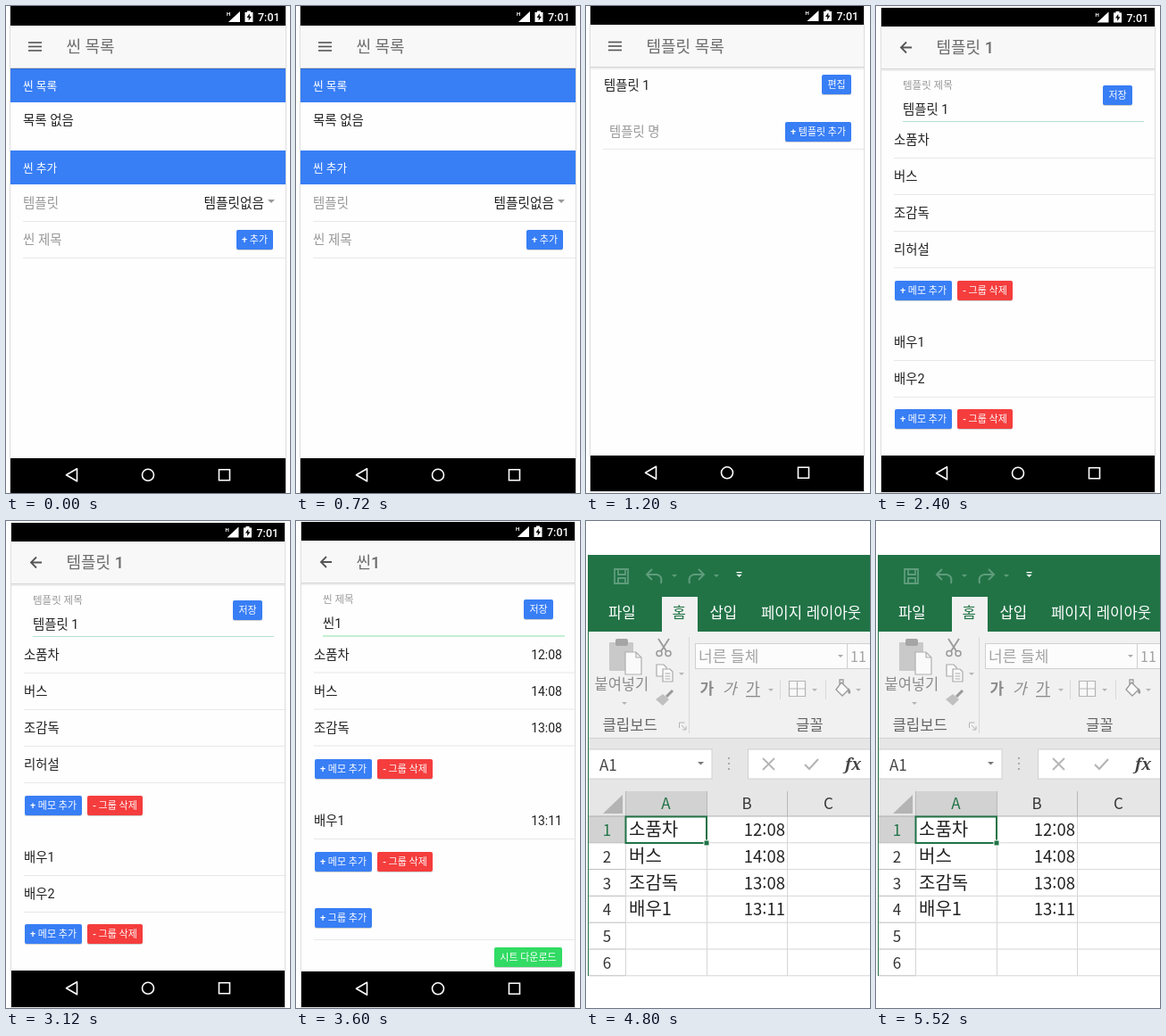
These frames come from a looping animation (318x546 px, 6000 ms). An HTML page:

```html
<!DOCTYPE html>
<html lang="ko">
<head>
<meta charset="utf-8">
<title>씬 목록</title>
<style>
  html, body { margin: 0; width: 100%; height: 100%; overflow: hidden; background: #fff; }
  svg { display: block; width: 100%; height: 100%; }
  text { font-family: Roboto, "Noto Sans CJK KR", "Noto Sans CJK", sans-serif; white-space: pre; }
  .sheet text { font-family: "Noto Sans CJK KR", "Noto Sans CJK", sans-serif; }
  .sheet .fx { font-family: "Noto Serif", serif; }
</style>
</head>
<body>
<svg id="stage" viewBox="0 0 318 546"></svg>
<script>
const BLUE = '#387ef5', RED = '#f53d3d', MINT = '#32db64', INK = '#222', MUTED = '#999';
const GREEN = '#217346', GREY = '#8b8b8b', FADED = '#b5b5b5';
const HOLD = 1200;

const rect = (x, y, right, bottom, fill, extra = '') =>
  `<rect x="${x}" y="${y}" width="${right - x}" height="${bottom - y}" fill="${fill}" ${extra}/>`;
const text = (x, y, str, size, fill = INK, extra = '') =>
  `<text x="${x}" y="${y}" font-size="${size}" fill="${fill}" ${extra}>${str}</text>`;
const path = (d, stroke, width = 1, fill = 'none', extra = '') =>
  `<path d="${d}" stroke="${stroke}" stroke-width="${width}" fill="${fill}" ${extra}/>`;
const shape = (d, fill) => path(d, 'none', 0, fill);
const rule = (y, x, right, color = '#e8e8e8') => rect(x, y, right, y + 1, color);
const caret = (x, y, fill, r = 3) => shape(`M${x - r} ${y}h${2 * r}l${-r} ${r}z`, fill);
const MIDDLE = 'text-anchor="middle"', END = 'text-anchor="end"', MEDIUM = 'font-weight="500"';

function button(x, y, right, label, fill = BLUE) {
  return rect(x, y + 1, right, y + 23, '#000', 'rx="2" opacity=".18"') +
    rect(x, y, right, y + 22, fill, 'rx="2"') +
    text((x + right) / 2, y + 14.7, label, 11, '#fff', `${MIDDLE} ${MEDIUM}`);
}

const memoButtons = y => button(21, y, 85, '+ 메모 추가') + button(91, y, 153, '- 그룹 삭제', RED);

function row(y, label, right, value = '') {
  return text(20, y, label, 14.4) + (value && text(298, y, value, 14, INK, END)) +
    rule(y + 15, 20, right);
}

function statusIcons(dx, dy) {
  return `<g transform="translate(${dx} ${dy})">` +
    text(247, 11, 'H', 6, '#fff', 'font-weight="700"') +
    shape('M262 6v12h-13z', '#fff') +
    shape('M267.5 7h2.5v-1.500h4v1.500h2.500v11h-9z', '#fff') +
    shape('M272.800 8.500l-3.300 4.500h2.200v3.500l3.200-4.700h-2.100z', '#000') +
    text(282, 17, '7:01', 12.5, '#fff', MEDIUM) + '</g>';
}

function navIcons(x, y) {
  return `<g transform="translate(${x} ${y})" fill="none" stroke="#fff" stroke-width="1.6">` +
    '<path d="M-79.500 7V-7L-91.500 0z" stroke-linejoin="round"/><circle r="6.500"/>' +
    '<path d="M79.500-6h12v12h-12z"/></g>';
}

// Device frame: status bar, toolbar, content area and navigation bar.
function phone({ left, right, top, status, toolbar, nav, bottom, title, back, icons, titleY, content }) {
  const iconY = titleY - 6.5;
  const menu = back
    ? path(`M40 ${iconY}H28m6-6l-6 6l6 6`, '#555', 1.8)
    : [-4.5, 0, 4.5].map(d => rect(25, iconY + d - 0.8, 40, iconY + d + 0.8, '#555')).join('');
  return rect(left - 1, top, right + 1, bottom + 1, '#ddd') +
    rect(left, top, right, bottom, '#fefefe') +
    rect(left, top, right, status, '#000') +
    rect(left, status, right, toolbar, '#f8f8f8') +
    rect(left, toolbar - 1, right, toolbar, '#d4d4d4') +
    rect(left, toolbar, right, toolbar + 2, '#eee') +
    menu + text(67.5, titleY, title, 18, '#6c6c6c', MEDIUM) +
    statusIcons(...icons) + content +
    rect(left, nav, right, bottom, '#000') +
    navIcons((left + right) / 2, (nav + bottom) / 2 - 0.7);
}

const sceneList = () => phone({
  left: 5, right: 313, top: 0, status: 22, toolbar: 70, nav: 507, bottom: 546,
  title: '씬 목록', titleY: 52, icons: [0, 0],
  content:
    rect(5, 70, 313, 108, BLUE) + rect(5, 70, 313, 71, '#2f69cb') +
    text(19, 94, '씬 목록', 12.7, '#fff', MEDIUM) +
    text(19, 133, '목록 없음', 14.5) +
    rect(5, 162, 313, 200, BLUE) + text(19, 186, '씬 추가', 12.7, '#fff', MEDIUM) +
    text(19, 226, '템플릿', 14.5, MUTED) +
    text(289, 226, '템플릿없음', 14.7, INK, END) + caret(297, 217, MUTED, 4) +
    rule(241, 19, 313) +
    text(19, 267, '씬 제목', 14.5, MUTED) + button(258, 251, 299, '+ 추가') +
    rule(282, 19, 313)
});

const templateList = () => phone({
  left: 5, right: 311, top: 0, status: 21, toolbar: 69, nav: 504, bottom: 544,
  title: '템플릿 목록', titleY: 51.5, icons: [-1.5, -1],
  content:
    text(20, 94, '템플릿 1', 14.4) + button(264, 77, 297, '편집') +
    text(26, 146, '템플릿 명', 14.4, MUTED) + button(223, 130, 297, '+ 템플릿 추가') +
    rule(160, 19, 311)
});

const templateEditor = () => phone({
  left: 6, right: 312, top: 2, status: 23, toolbar: 71, nav: 504, bottom: 545,
  title: '템플릿 1', titleY: 53, icons: [-1.5, 0.5], back: true,
  content:
    text(30, 93, '템플릿 제목', 11.5, MUTED) + text(30, 121, '템플릿 1', 14.4) +
    rule(129, 30, 300, '#b5dfcf') + button(254, 89, 287, '저장') +
    ['소품차', '버스', '조감독', '리허설'].map((s, i) => row(155 + 41 * i, s, 312)).join('') +
    memoButtons(308) +
    row(382, '배우1', 312) + row(423, '배우2', 312) + memoButtons(452)
});

const CALLS = [['소품차', '12:08'], ['버스', '14:08'], ['조감독', '13:08'], ['배우1', '13:11']];

const sceneEditor = () => phone({
  left: 6, right: 312, top: 1, status: 22, toolbar: 70, nav: 505, bottom: 545,
  title: '씬1', titleY: 52.5, icons: [-1, 0], back: true,
  content:
    text(30, 92, '씬 제목', 11.5, MUTED) + text(30, 120, '씬1', 14.4) +
    rule(128.5, 30, 301, '#8ce3a6') + button(255, 88, 288, '저장') +
    CALLS.slice(0, 3).map(([s, v], i) => row(154.5 + 41 * i, s, 312, v)).join('') +
    memoButtons(267) + row(341, ...[CALLS[3][0], 312, CALLS[3][1]]) + memoButtons(371) +
    button(21, 434, 85, '+ 그룹 추가') + rule(469, 20, 312) +
    button(222, 478, 298, '시트 다운로드', MINT)
});

function ribbon() {
  const undo = 'M74 54l-6 6l6 6m-6-6h11q7 1 5 10';
  const font = (x, extra) => text(x, 194, '가', 17, GREY, extra);
  return rect(3, 38, 318, 124, GREEN) +
    path('M32 54h15v16h-15zM36 54v6h8v-6M36 70v-6h8v6', '#5f9c7b', 1.8) +
    path(undo, '#5f9c7b', 2) +
    path(undo, '#5f9c7b', 2, 'none', 'transform="translate(200 0) scale(-1 1)"') +
    caret(99, 60, '#5f9c7b') + caret(146, 60, '#5f9c7b') +
    rect(168.5, 57, 174.5, 58.3, '#fff') + caret(171.5, 60, '#fff') +
    rect(85, 85, 125, 125, '#f1f1f1') +
    text(25, 109, '파일', 16.7, '#fff') + text(96.5, 109, '홈', 16.7, GREEN, MEDIUM) +
    text(138.500, 109, '삽입', 16.7, '#fff') + text(196, 109, '페이지 레이아웃', 16.7, '#fff') +
    rect(3, 124, 318, 243, '#f1f1f1') +
    rect(26, 136, 53, 168, '#c9c9c9', 'rx="1"') + rect(33, 132, 47, 140, '#a5a5a5', 'rx="2"') +
    path('M44 147h12l6 6v19h-18zM56 147v6h6', '#b0b0b0', 1.2, '#fafafa') +
    text(9.5, 189, '붙여넣기', 16.5, GREY) + caret(43, 203, FADED) +
    path('M81 132l9 14M93 132l-9 14', '#999', 1.8) +
    '<g fill="none" stroke="#999" stroke-width="1.5"><circle cx="82" cy="148.500" r="3"/><circle cx="92" cy="148.500" r="3"/></g>' +
    path('M79 161h8l3 3v10h-11z', '#aaa', 1.2, '#fafafa') +
    path('M86 166h8l3 3v11h-11zM88.500 171h6m-6 3h6m-6 3h6', '#aaa', 1.2, '#fafafa') +
    caret(107, 170, FADED) +
    path('M97 190l-7 7', '#999', 3) + shape('M86 194l7 6l-7 7l-8-7z', '#c0c0c0') +
    text(18.5, 235, '클립보드', 16.7, '#666') +
    path('M104.500 232v-6h6M107 229l5 5m0-4v4h-4', FADED, 1) +
    rect(115, 130, 116, 238, '#d8d8d8') +
    rect(122.5, 137.5, 292.5, 165.5, '#fcfcfc', 'stroke="#d0d0d0"') +
    rect(292.5, 137.5, 320, 165.5, '#fcfcfc', 'stroke="#d0d0d0"') +
    text(126, 158, '너른 들체', 17, '#a3a3a3') + text(296, 158, '11', 16, '#a3a3a3') +
    caret(285, 150, '#aaa') +
    font(127.5, 'font-weight="700"') + font(153, 'font-style="italic"') + font(179, '') +
    rect(179, 196, 195, 197.3, GREY) + caret(207, 188, FADED) +
    rect(217, 178, 218, 200, '#d8d8d8') +
    path('M227.500 179.500h18v17h-18zM236.500 179.500v17M227.500 188h18', FADED, 1.2, '#f8f8f8') +
    caret(256, 188, FADED) + rect(268, 178, 269, 200, '#d8d8d8') +
    path('M286 181l8 8l-7 7l-7-7zM284 184v-6h4v5', '#999', 1.3, '#fafafa') +
    shape('M294 187q4 5 1 7q-3-1-1-7', '#999') + caret(305, 188, FADED) +
    text(235, 235, '글꼴', 16.7, '#666');
}

function formulaBar() {
  return rect(3, 243, 318, 331, '#e6e6e6') + rect(3, 243, 318, 244, '#d2d2d2') +
    rect(3, 256, 141, 289, '#fff', 'stroke="#d0d0d0"') +
    rect(181.5, 256, 320, 289, '#fff', 'stroke="#d0d0d0"') +
    text(15, 280, 'A1', 17, '#444') + caret(128.500, 270, '#777', 3.5) +
    [266, 272, 278].map(y => rect(159, y - 1, 161, y + 1, '#aaa')).join('') +
    path('M198 266l13 13m0-13l-13 13', '#b5b5b5', 1.8) +
    path('M245 273l5 5l10-11', '#b5b5b5', 2.2) +
    text(290, 279, 'fx', 18, '#444', 'class="fx" font-style="italic" font-weight="600"');
}

function grid() {
  const rowY = i => 331 + 29.8 * i;
  const columns = [['A', 44, 135], ['B', 135, 225], ['C', 225, 318]];
  let out = rect(44, 331, 318, 510, '#fff') + rect(44, 303, 135, 331, '#d2d2d2') +
    rect(3, 331, 44, rowY(1), '#d2d2d2') + shape('M41 307v21h-22z', '#b4b4b4');
  for (const [name, x, right] of columns) {
    out += text((x + right) / 2, 323, name, 17, name === 'A' ? GREEN : '#333', MIDDLE) +
      rect(x, 303, x + 1, 331, '#b9b9b9') + rect(x, 331, x + 1, 510, '#d6d6d6');
  }
  for (let i = 0; i < 6; i++) {
    const base = rowY(i) + 22;
    out += text(23.5, base, i + 1, 17, i ? '#333' : GREEN, MIDDLE) +
      rect(3, rowY(i + 1) - 0.5, 44, rowY(i + 1) + 0.5, '#bcbcbc') +
      rect(44, rowY(i + 1) - 0.5, 318, rowY(i + 1) + 0.5, '#d6d6d6');
    if (CALLS[i]) out += text(48, base, CALLS[i][0], 20, INK) + text(223, base, CALLS[i][1], 18.5, INK, END);
  }
  return out + rect(3, 330.5, 318, 331.5, '#b0b0b0') +
    rect(44.5, 331.5, 135, 361, 'none', `stroke="${GREEN}" stroke-width="2"`) +
    rect(132, 358, 138, 364, GREEN, 'stroke="#fff"') +
    rect(2, 38, 3, 510, GREEN);
}

const spreadsheet = () => `<g class="sheet">${ribbon()}${formulaBar()}${grid()}</g>`;

const screens = [sceneList, templateList, templateEditor, sceneEditor, spreadsheet].map(draw => draw());
const stage = document.getElementById('stage');
let shown = -1;

function render(time) {
  const index = Math.floor(time / HOLD) % screens.length;
  if (index === shown) return;
  shown = index;
  stage.innerHTML = screens[index];
}

function tick() {
  render(performance.now() - start);
  requestAnimationFrame(tick);
}

const start = performance.now();
tick();
</script>
</body>
</html>
```
